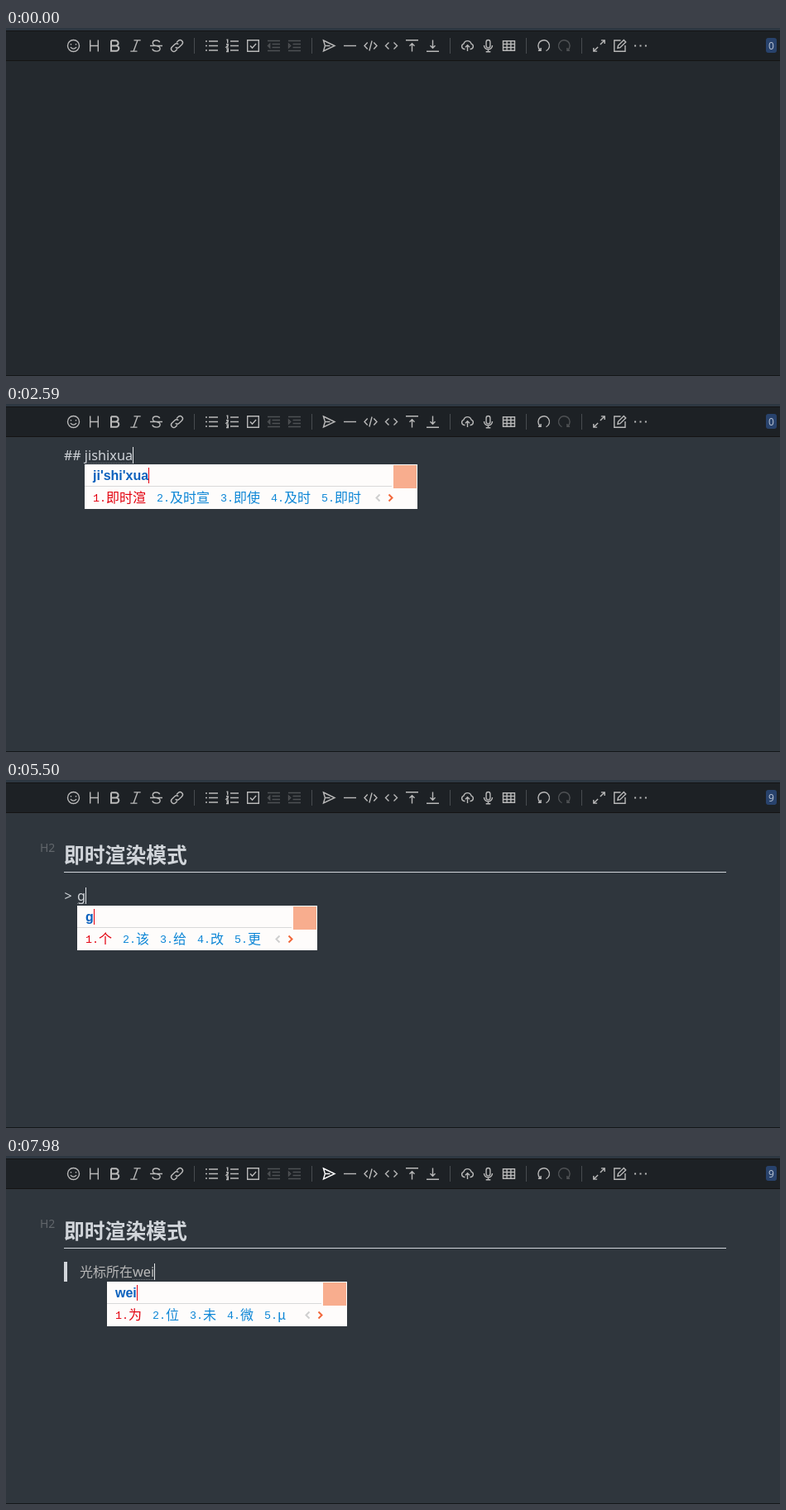
Recreate the animation shown at these times as an HTML page. Size 935 px wide and 421 px high, loop 8 s.

```html
<!DOCTYPE html>
<html lang="zh-CN">
<head>
<meta charset="utf-8">
<title>Markdown editor</title>
<style>
  html, body { margin: 0; width: 100%; height: 100%; overflow: hidden; background: #2f363d; }
  svg { display: block; }
  text { font-family: "Noto Sans", "Noto Sans CJK SC", "Noto Sans CJK", sans-serif; white-space: pre; }
  .icon { fill: none; stroke: #b9b9b9; stroke-width: 1.4; }
  .icon.heavy { stroke-width: 2; }
  .icon.dim { opacity: .32; }
  .icon.on { stroke: #fff; }
  .body { font-size: 16px; fill: #d1d5da; }
  .typed { font-size: 16.3px; }
  .quote { fill: #b9b9b9; }
  .h2 { font-size: 24.8px; font-weight: 700; fill: #d1d5da; }
  .marker { fill: #9876aa; }
  .label { font-size: 14px; fill: #61666b; }
  .count { font-size: 12px; fill: #b4bfd0; text-anchor: middle; }
  .pinyin { font: bold 16px "Liberation Sans", Arial, sans-serif; fill: #0a60bd; }
  .num { font: 13.33px "Liberation Mono", monospace; }
  .cand { font: 16px "Noto Sans CJK SC", "Noto Sans CJK", sans-serif; font-weight: 300; }
  .note { font-size: 12.6px; }
</style>
</head>
<body>
<svg width="935" height="421" viewBox="0 0 935 421">
  <rect id="page" width="935" height="421"/>
  <rect width="935" height="3" fill="#2d3741"/>
  <rect y="3" width="935" height="37" fill="#141414"/>
  <rect y="4" width="935" height="35" fill="#1d2125"/>
  <rect y="420" width="935" height="1" fill="#141719"/>
  <g id="toolbar"></g>
  <rect x="918" y="12" width="13" height="18" rx="3" fill="#28426c"/>
  <text id="count" class="count" x="924.5" y="26"></text>
  <g id="editor"></g>
</svg>
<script>
const LOOP = 8000;
const $ = id => document.getElementById(id);

// Toolbar icons: [centre x, path, extra class]
const icons = [
  [81.5, "M-7 0a7 7 0 1 0 14 0a7 7 0 1 0-14 0M-3-2.6v1.6M3-2.6v1.6M-3.6 1.6Q0 5.6 3.6 1.6"],
  [106.5, "M-4.8-7V7M4.8-7V7M-4.8 0H4.8", "", "heading"],
  [131.5, "M-4.5-6.3H1a3.1 3.1 0 0 1 0 6.2H-4.5M1-.1H1.6a3.2 3.2 0 0 1 0 6.4H-4.5V-6.3", "heavy"],
  [156.5, "M-2-6.6H6.2M-6.2 6.6H2M2.4-6.6L-2.4 6.6"],
  [181.5, "M-7.5 0H7.5M4.2-4.2C3-7.5-4.2-7.3-4.2-3.4C-4.2-1.2-2 0 0 0C2.5.4 4.6 1.3 4.6 3.5C4.6 7.5-3.6 7.6-4.6 3.8"],
  [206.5, "M-1.8 1.8a3.2 3.2 0 0 0 4.4 0L6-1.6A3.1 3.1 0 0 0 1.6-6L-.4-4M1.8-1.8a3.2 3.2 0 0 0-4.4 0L-6 1.6A3.1 3.1 0 0 0-1.6 6L.4 4"],
  [248.5, "M-7.5-5.5h2M-7.5 0h2M-7.5 5.5h2M-3.5-5.5H7.5M-3.5 0H7.5M-3.5 5.5H7.5"],
  [273.5, "M-7-7.2h1.2v4M-7.5-1.8h2.2v1.4l-2 2h2.4M-7.5 3.4h2.3v3.6h-2.3M-6.8 5.2h1.5M-2.5-5.5H7.5M-2.5 0H7.5M-2.5 5.5H7.5"],
  [298.5, "M-6.8-6.8H6.8V6.8H-6.8ZM-3.5 0L-1 2.6L3.6-2.5"],
  [323.5, "M-7.5-6H7.5M-2-2H7.5M-2 2H7.5M-7.5 6H7.5M-4.8-2.2L-7 0L-4.8 2.2Z", "dim"],
  [348.5, "M-7.5-6H7.5M-2-2H7.5M-2 2H7.5M-7.5 6H7.5M-7-2.2L-4.8 0L-7 2.2Z", "dim"],
  [390, "M-6.5-6.5L7 0L-6.5 6.5L-4.6 0ZM-4.6 0H1.5", "", "quote"],
  [415.5, "M-7.5 0H7.5"],
  [440.5, "M-3.8-4L-7.5 0L-3.8 4M3.8-4L7.5 0L3.8 4M1.6-6L-1.6 6"],
  [465.5, "M-3-4L-7 0L-3 4M3-4L7 0L3 4"],
  [490.5, "M-7.5-6.8H7.5M0 7V-3M-3 .2L0-2.8L3 .2"],
  [515.5, "M-7.5 6.8H7.5M0-7V3M-3-.2L0 2.8L3-.2"],
  [557.5, "M-3 4H-4A3.3 3.3 0 0 1-4.6-2.4A4.8 4.8 0 0 1 4.6-2.4A3.3 3.3 0 0 1 4 4H3M0 6.5V-.5M-2.6 1.8L0-.8L2.6 1.8"],
  [582.5, "M-2.4-4.6a2.4 2.4 0 0 1 4.8 0V0a2.4 2.4 0 0 1-4.8 0ZM-5-.6a5 5 0 0 0 10 0M0 4.4V7.3M-2.8 7.3H2.8"],
  [607.5, "M-7-5.8H7V5.8H-7ZM-7-2H7M-7 2H7M-2.4-5.8V5.8M2.4-5.8V5.8"],
  [649.5, "M3 6.2A6.8 6.8 0 1 0-4.2 5.2M-6.6 5.8H-3.4V2.4"],
  [674.5, "M-3 6.2A6.8 6.8 0 1 1 4.2 5.2M6.6 5.8H3.4V2.4", "dim"],
  [716.5, "M1.4-1.4L6.5-6.5M2.4-6.6H6.7V-2.4M-1.4 1.4L-6.5 6.5M-2.4 6.6H-6.7V2.4"],
  [741.5, "M1-6.5H-6.7V6.7H6.5V-.5M-2.6 2.8L-2-.2L4.8-7L7.2-4.6L.4 2.2Z"],
  [766.5, "M-7.4 0h2M-1 0h2M5.4 0h2", "heavy"],
];

$("toolbar").innerHTML =
  icons.map(([x, d, cls = "", id]) =>
    `<path ${id ? `id="${id}"` : ""} class="icon ${cls}" transform="translate(${x} 21.5)" d="${d}"/>`).join("") +
  [227, 369, 536, 628, 695].map(x => rect(x, 12, 1, 19, "#484c50")).join("");

// Where the input method window opens, and the caret's top and height
const scenes = {
  line:    { popup: [95, 73],   caret: [52, 20] },
  heading: { popup: [208, 106], caret: [73, 32] },
  raw:     { popup: [86, 152],  caret: [130, 20] },
  quote:   { popup: [122, 152], caret: [130, 20] },
};

// [time, scene, committed text, pinyin, candidates]
const steps = [
  [0, "line", ""], [530, "line", ""], [1000, "line", ""],
  [1170, "line", "#"], [1340, "line", "##"], [1510, "line", "## "],
  [1680, "line", "## ", "j"],
  [1750, "line", "## ", "j", "就 家 叫 将 几"],
  [1850, "line", "## ", "ji", "及 几 即 记 级"],
  [1920, "line", "## ", "ji's", "即使 计算 及时 技术 集散"],
  [2020, "line", "## ", "ji'sh", "即使 及时 技术 即时 计算"],
  [2090, "line", "## ", "ji'shi", "及时 即使 即时 集市 纪实"],
  [2260, "line", "## ", "ji'shi'x", "即时性 及时性 即使 及时 即时"],
  [2430, "line", "## ", "ji'shi'xu", "即时需 及时需 即使 及时 即时"],
  [2590, "line", "## ", "ji'shi'xua", "即时渲 及时宣 即使 及时 即时"],
  [2660, "line", "## ", "ji'shi'xuan", "即时选 及时选 即时(xuan)宣 即使 及时"],
  [2830, "line", "## ", "ji'shi'xuan'r", "即时渲染 即时选 即使 及时 即时"],
  [2960, "heading", "即时渲染"],
  [3130, "heading", "即时渲染", "m", "吗 没 么 嘛 们"],
  [3260, "heading", "即时渲染", "mo", "模 默 摸 磨 末"],
  [3390, "heading", "即时渲染", "mo's", "模式 没事 陌生 磨损 模 "],
  [3490, "heading", "即时渲染", "mo'sh", "模式 陌生 没事 魔兽 磨损"],
  [3560, "heading", "即时渲染", "mo'shi", "模式 默(mo)示 末世 磨 莫"],
  [3660, "heading", "即时渲染模式"],
  [3960, "raw", ""], [4430, "raw", ""], [4730, "raw", ""],
  [4900, "raw", ">"], [5070, "raw", "> "],
  [5500, "raw", "> ", "g", "个 该 给 改 更"],
  [5630, "raw", "> ", "gu", "古 故 股 顾 骨"],
  [5730, "raw", "> ", "gua", "挂 瓜 刮 寡 卦"],
  [5800, "raw", "> ", "guan", "关 管 官 观 惯"],
  [5900, "raw", "> ", "guang", "光 广 逛 关(guan)个 管个"],
  [6070, "raw", "> ", "guang'b", "光标 广播 光斑 关(guan)闭 广博"],
  [6140, "raw", "> ", "guang'bi", "光比 关闭 光壁 关(guan)比 广碧"],
  [6310, "raw", "> ", "guang'bia", "光标 贯(guan)标 关闭啊 管标 广播"],
  [6380, "raw", "> ", "guang'biao", "光标 贯(guan)标 关闭 管 关"],
  [6610, "quote", "光标"],
  [6780, "quote", "光标", "s", "是 说 上 所 时"],
  [6850, "quote", "光标", "s", "是 说 上 所 时"],
  [6950, "quote", "光标", "su", "素 速 苏 诉 宿"],
  [7050, "quote", "光标", "suo", "所 锁 缩 索 说"],
  [7220, "quote", "光标", "suo'z", "所在 所做 所指 所致 所值"],
  [7450, "quote", "光标", "suo'za", "所在 缩杂 所砸 锁匝 所咋"],
  [7520, "quote", "光标", "suo'zai", "所在 锁在 缩在 所载 索在"],
  [7620, "quote", "光标所在"],
  [7790, "quote", "光标所在", "w", "我 为 无 问 玩"],
  [7890, "quote", "光标所在", "we", "为 位 未 问 文"],
  [7980, "quote", "光标所在", "wei", "为 位 未 微 μ"],
];

const pen = document.createElement("canvas").getContext("2d");
const SANS = '"Noto Sans", "Noto Sans CJK SC", "Noto Sans CJK", sans-serif';

function measure(str, font) {
  pen.font = font;
  return pen.measureText(str).width;
}

function rect(x, y, w, h, fill) {
  return `<rect x="${x}" y="${y}" width="${w}" height="${h}" fill="${fill}"/>`;
}

function text(x, y, cls, str, extra = "") {
  return `<text x="${x}" y="${y}" class="${cls}" ${extra}>${str.replace(/>/g, "&gt;")}</text>`;
}

function popup([left, top], pinyin, list) {
  const base = top + 46;
  let x = left + 10, words = "";
  list.trim().split(" ").forEach((word, i) => {
    const fill = `fill="${i ? "#0c86d6" : "#e3000f"}"`;
    words += text(x, base - 1, "num", `${i + 1}.`, fill);
    x += 16;
    for (const part of word.split(/(\(.*\))/)) {
      const note = part.startsWith("(");
      words += text(x, base, note ? "note" : "cand", part, fill);
      x += note ? measure(part, "12.6px " + SANS) : part.length * 16;
    }
    x += 13;
  });
  const right = Math.round(x - 13 + 68);
  const end = Math.round(left + 10 + measure(pinyin, 'bold 16px "Liberation Sans", Arial, sans-serif'));
  const chevron = (cx, dir, color) =>
    `<path d="M${cx - 2 * dir} ${top + 36.5}l${4 * dir} 4l${-4 * dir} 4" fill="none" stroke="${color}" stroke-width="2"/>`;
  return rect(left, top, right - left, 54, "#fefcfb") +
    rect(left, top + 26, right - left - 31, 1, "#d9d9d9") +
    rect(right - 29, top + 1, 28, 28, "#f8ad8e") +
    text(left + 10, top + 19, "pinyin", pinyin) +
    rect(end, top + 4, 1, 19, "#e3000f") + words +
    chevron(right - 47.5, -1, "#cfcfcf") + chevron(right - 32.5, 1, "#f2673a");
}

function draw([time, scene, done, pinyin = "", list]) {
  const typed = pinyin.replace(/'/g, "");
  const { popup: corner, caret } = scenes[scene];
  const inHeading = scene === "heading";
  let out = "", x = 70;

  if (scene !== "line") {
    out += text(41, 87, "label", "H2") + rect(70, 111, 800, 1, "#d1d5da");
    if (!inHeading) out += text(70, 100, "h2", "即时渲染模式");
  }
  if (scene === "line") {
    out += text(x, 68, "body", done);
    x += measure(done, "16px " + SANS);
  } else if (inHeading) {
    out += text(70, 100, "h2 marker", "##") + text(109, 100, "h2", done);
    x = 109 + done.length * 24.8;
  } else if (scene === "raw") {
    if (done) out += text(70.5, 146, "body", ">");
    x += [0, 12, 16][done.length];
  } else {
    out += rect(70, 128, 4, 24, "#d1d5da") + text(89, 146, "body quote", done);
    x = 89 + done.length * 16;
  }

  if (typed) {
    const base = inHeading ? 100 : scene === "line" ? 68 : 146;
    const cls = inHeading ? "h2" : `body typed ${scene}`;
    const width = measure(typed, (inHeading ? "bold 24.8px " : "16.3px ") + SANS);
    out += text(x, base, cls, typed);
    if (!inHeading)
      out += `<path d="M${x} ${base + 3.5}h${width}" stroke="#d1d5da" stroke-dasharray="1 1" opacity=".45"/>`;
    x += width;
  }

  const hidden = time < 530 || time === 1000 || time === 4430;
  if (!hidden) out += rect(Math.round(x), caret[0], 1, caret[1], "#e4e7ea");
  if (list) out += popup(corner, pinyin, list);

  $("editor").innerHTML = out;
  $("page").setAttribute("fill", time < 530 ? "#24292e" : "#2f363d");
  $("count").textContent = time < 4730 ? "0" : "9";
  $("heading").classList.toggle("on", time >= 3260 && time < 3960);
  $("quote").classList.toggle("on", time >= 6850);
}

const start = performance.now();
let shown;

function tick() {
  const t = (performance.now() - start) % LOOP;
  const step = steps.findLast(s => s[0] <= t);
  if (step !== shown) draw(shown = step);
  requestAnimationFrame(tick);
}
tick();
</script>
</body>
</html>
```
